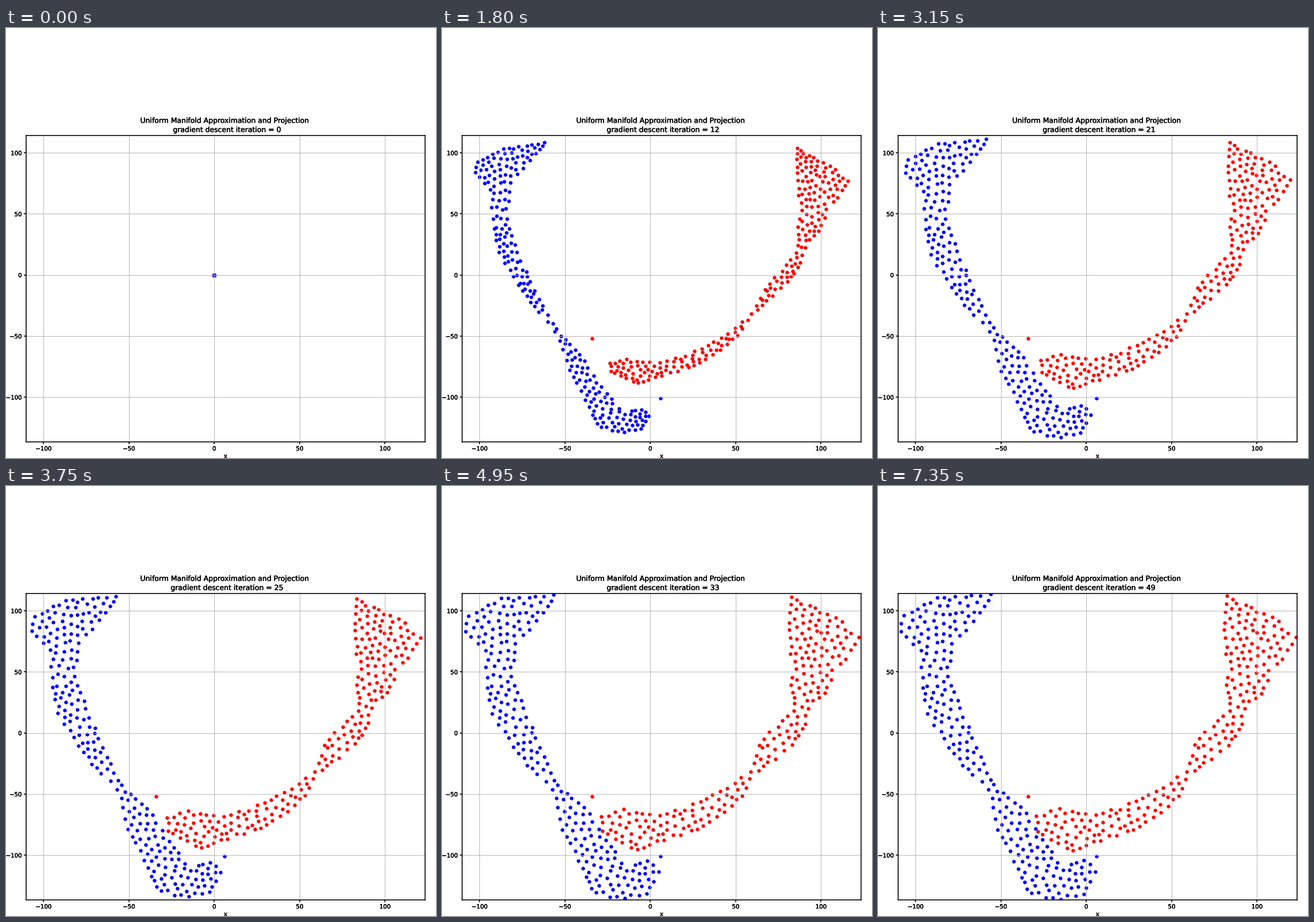
A matplotlib script that plays this animation: 748 px wide and 748 px high, repeating every 7.5 s.

```python
import numpy as np
import matplotlib.pyplot as plt
import matplotlib.patheffects as pe
from matplotlib.animation import FuncAnimation
from matplotlib.path import Path

SIZE, FRAMES, STEP = 748, 50, 150
ORIGIN = np.array([362.3, 429.7])
SCALE = np.array([2.97, -2.125])
LEFT, RIGHT, TOP, BOTTOM = 35, 729, 187, 719.5

# Cross-sections of the settled ribbons in stage pixels: outer x, y, inner x, y.
BLUE = [
    (100, 195, 198, 190), (40, 230, 184, 214), (38, 253, 158, 245),
    (77, 285, 131, 267), (76, 335, 120, 325), (90, 403, 146, 398),
    (148, 486, 185, 489), (199, 535, 206, 528), (206, 585, 251, 562),
    (260, 703, 298, 632), (305, 718, 328, 674), (354, 711, 338, 656),
    (376, 674, 368, 650),
]
RED = [
    (624, 200, 608, 192), (690, 230, 605, 225), (727, 265, 604, 268),
    (702, 299, 606, 292), (680, 322, 617, 318), (667, 358, 608, 342),
    (632, 390, 612, 385), (632, 419, 589, 405), (612, 448, 552, 452),
    (537, 506, 533, 502), (520, 542, 500, 523), (470, 586, 425, 560),
    (400, 611, 376, 573), (337, 632, 311, 564), (279, 602, 277, 575),
]


def sq_dist(a, b):
    return ((a ** 2).sum(1)[:, None] + (b ** 2).sum(1) - 2 * a @ b.T).clip(0)


def pack(outline, count, rng, margin=6):
    """Fill an outline evenly: farthest-point start, then Lloyd relaxation."""
    sample = rng.uniform(outline.min(0) - margin, outline.max(0) + margin,
                         (18000, 2))
    ends = np.roll(outline, -1, axis=0)
    s = np.linspace(0, 1, 20, endpoint=False)[:, None, None]
    border = (outline + (ends - outline) * s).reshape(-1, 2)
    near = sq_dist(sample, border).min(1) < margin ** 2
    sample = sample[near | Path(outline).contains_points(sample)]

    dots, gap = [sample[0]], np.full(len(sample), np.inf)
    while len(dots) < count:
        gap = np.minimum(gap, ((sample - dots[-1]) ** 2).sum(1))
        dots.append(sample[gap.argmax()])
    dots = np.array(dots)
    for _ in range(50):
        owner = sq_dist(sample, dots).argmin(1)
        n = np.bincount(owner, minlength=count).clip(1)
        dots = np.stack([np.bincount(owner, sample[:, k], count) / n
                         for k in (0, 1)], axis=1)
    return dots


def cloud(sections, stray, count, seed, reach=34, pull=0.87):
    """Return settled positions and the offsets to the tight early shape."""
    rows = np.array(sections, float)
    outline = np.vstack([rows[:, :2], rows[::-1, 2:]])
    dots = pack(outline, count, np.random.default_rng(seed))
    # Early on every dot sits near the mean of its neighbourhood.
    w = np.exp(-sq_dist(dots, dots) / (2 * reach ** 2))
    shift = pull * (w @ dots / w.sum(1, keepdims=True) - dots)
    return np.vstack([dots, stray]), np.vstack([shift, (0, 0)])


def amount(i):
    """Share of the offset left: cubic cooling, flattened at the start."""
    f = (1 - i / FRAMES) ** 3
    return (f - 0.65 * max(f - 0.62, 0)) / 0.593


plt.rcParams["font.family"] = "DejaVu Sans"
bold = [pe.withStroke(linewidth=0.5, foreground="black")]

fig = plt.figure(figsize=(SIZE / 72, SIZE / 72), dpi=72, facecolor="white")
ax = fig.add_axes([LEFT / SIZE, 1 - BOTTOM / SIZE,
                   (RIGHT - LEFT) / SIZE, (BOTTOM - TOP) / SIZE])
ax.set_xlim((np.array([LEFT, RIGHT]) - ORIGIN[0]) / SCALE[0])
ax.set_ylim((np.array([BOTTOM, TOP]) - ORIGIN[1]) / SCALE[1])
ax.set_xticks(range(-100, 101, 50))
ax.set_yticks(range(-100, 101, 50))
ax.grid(True, color="#b0b0b0", linewidth=0.9)
ax.tick_params(length=4, width=1.6, pad=3.5, labelsize=10.2)
for spine in ax.spines.values():
    spine.set_linewidth(1.6)
for label in ax.get_xticklabels() + ax.get_yticklabels():
    label.set_path_effects(bold)


def caption(x, y, text, size):
    return fig.text(x / SIZE, 1 - y / SIZE, text, fontsize=size, ha="center",
                    va="baseline", path_effects=bold)


caption(380, 165, "Uniform Manifold Approximation and Projection", 12.42)
counter = caption(384, 181, "", 12.42)
caption(382, 748, "x", 10.2)

groups = []
for color, sections, stray, count, seed in [
    ("red", RED, (261, 540), 222, 4),
    ("blue", BLUE, (380, 644), 232, 9),
]:
    end, shift = cloud(sections, stray, count, seed)
    dots = ax.scatter(np.zeros(len(end)), np.zeros(len(end)),
                      s=41, c=color, linewidths=0)
    groups.append((dots, end, shift))


def draw(i):
    for dots, end, shift in groups:
        pos = (end + shift * amount(i) - ORIGIN) / SCALE
        dots.set_offsets(pos if i else np.zeros_like(pos))
    counter.set_text(f"gradient descent iteration = {i}")
    return [g[0] for g in groups] + [counter]


anim = FuncAnimation(fig, draw, frames=FRAMES, interval=STEP,
                     repeat=True, repeat_delay=0, blit=False)
plt.show()
```
